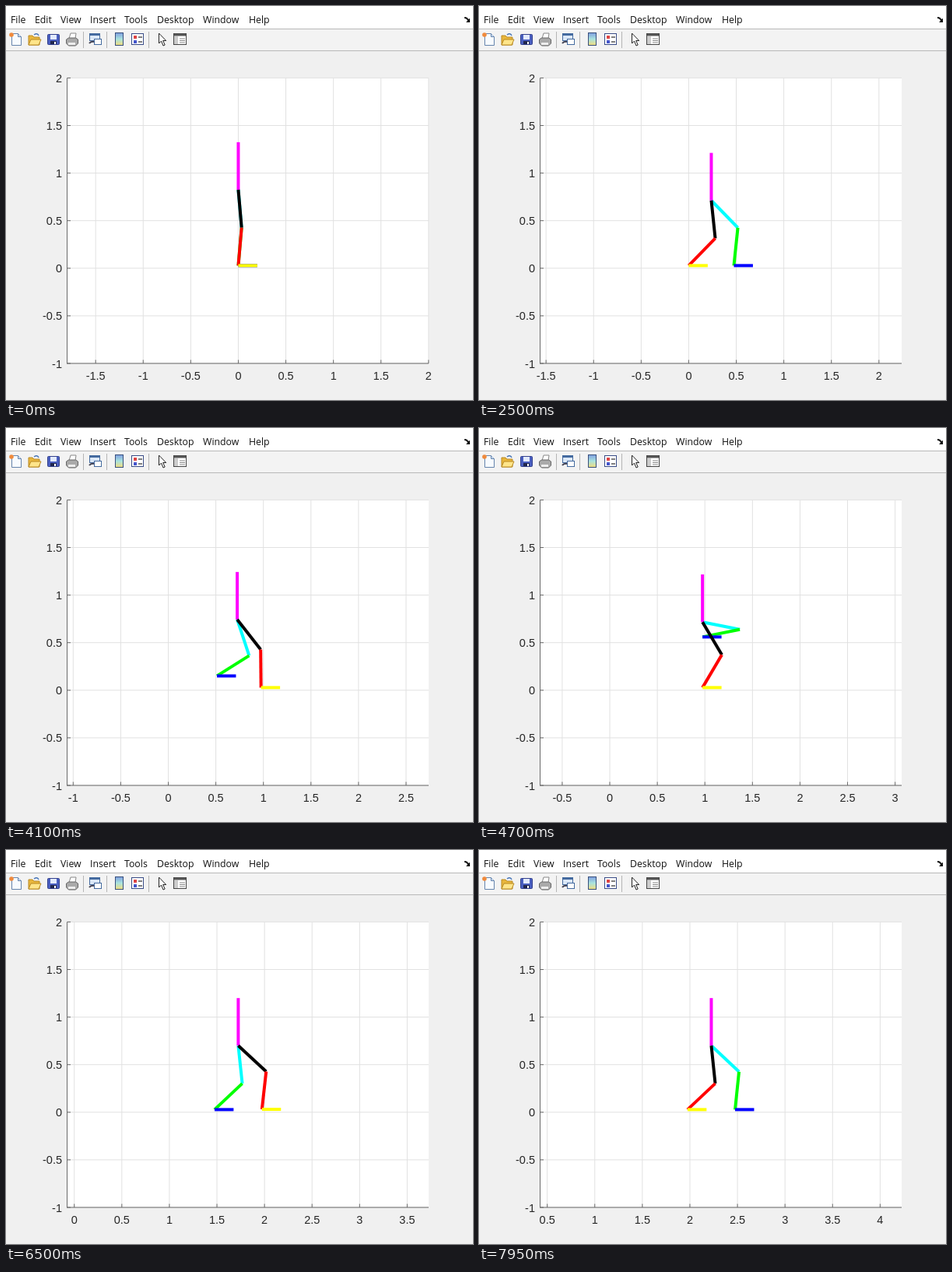
An HTML page with a canvas that plays this animation: 600 px wide and 506 px high, repeating every 8 s.

```html
<!DOCTYPE html>
<html lang="en">
<head>
<meta charset="utf-8">
<title>Walking figure</title>
<style>
  html, body { margin: 0; width: 100%; height: 100%; overflow: hidden; background: #f0f0f0; }
  svg, canvas { position: absolute; left: 0; top: 0; width: 600px; height: 506px; }
  text { font: 12.3px "Open Sans", "Noto Sans", sans-serif; fill: #111; }
</style>
</head>
<body>
<svg viewBox="0 0 600 506">
  <rect width="600" height="29" fill="#fff"/>
  <rect y="29" width="600" height="28" fill="#f3f3f3"/>
  <path d="M0 29.5H600M0 57.5H600" stroke="#b8b8b8"/>
  <g id="menu">
    <text x="6" y="22">File</text><text x="37" y="22">Edit</text>
    <text x="70" y="22">View</text><text x="108" y="22">Insert</text>
    <text x="152" y="22">Tools</text><text x="194" y="22">Desktop</text>
    <text x="253" y="22">Window</text><text x="312" y="22">Help</text>
  </g>
  <path d="M589 14q4 0 5 3l2-1v5h-5l2-2q-1-3-4-3z" fill="#111"/>
  <path d="M99.5 33V54M129.500 33V54M183.500 33V54" stroke="#b5b5b5"/>
  <!-- new -->
  <path d="M7.500 35.500h8l4 4v11h-12z" fill="#f7fbff" stroke="#6685ad"/>
  <path d="M15.500 35.500v4h4" fill="#cfe0f4" stroke="#6685ad"/>
  <circle cx="7" cy="37" r="2.800" fill="#f08a3c"/>
  <!-- open -->
  <path d="M29 50V38h5l2 2h7v10z" fill="#e8b63c" stroke="#b98a24"/>
  <path d="M29 50l3-7h13l-3 7z" fill="#ffe58a" stroke="#b98a24"/>
  <path d="M36 37q4-3 6 1" fill="none" stroke="#4876b8" stroke-width="1.500"/>
  <!-- save -->
  <rect x="53.500" y="36.500" width="15" height="13" rx="1" fill="#4a5fc0" stroke="#33408c"/>
  <rect x="57" y="37" width="8" height="6" fill="#e3ebff"/>
  <rect x="57" y="45" width="8" height="4" fill="#20264e"/>
  <rect x="62" y="46" width="2" height="3" fill="#fff"/>
  <!-- print -->
  <path d="M81 42l2-7h7l-1 7z" fill="#fff" stroke="#888"/>
  <path d="M77.500 43l3-2h9l3 2v5l-3 3h-9l-3-3z" fill="#aaa" stroke="#666"/>
  <path d="M80 47h9v3h-9z" fill="#eee"/>
  <!-- linked plots -->
  <rect x="107.500" y="35.500" width="13" height="9" fill="#dbe8f8" stroke="#446a9f"/>
  <path d="M108 37h12" stroke="#446a9f" stroke-width="2"/>
  <rect x="113.500" y="42.500" width="9" height="7" fill="#fff" stroke="#446a9f"/>
  <path d="M107 48q2-3 6-2" fill="none" stroke="#445" stroke-width="2"/>
  <!-- colour bar -->
  <linearGradient id="bar" x2="0" y2="1">
    <stop stop-color="#7f9fe0"/><stop offset=".5" stop-color="#a9e3de"/><stop offset="1" stop-color="#f1dc7c"/>
  </linearGradient>
  <rect x="140.500" y="34.500" width="10" height="16" fill="url(#bar)" stroke="#38507c"/>
  <!-- legend -->
  <rect x="161.500" y="35.500" width="15" height="14" fill="#fff" stroke="#3a4c87"/>
  <path d="M164 38h4v4h-4z" fill="#d44"/><path d="M164 44h4v4h-4z" fill="#45c"/>
  <path d="M170 40h5M170 46h5" stroke="#555" stroke-width="1.500"/>
  <!-- pointer -->
  <path d="M196.500 35v13l3-3 2.500 6 2.200-1-2.500-5.500h4z" fill="#fff" stroke="#222"/>
  <!-- inspector -->
  <rect x="215.500" y="35.500" width="16" height="14" fill="#fff" stroke="#444"/>
  <path d="M216 37h15" stroke="#555" stroke-width="3"/>
  <path d="M216 39h5v10h-5z" fill="#ccc"/>
  <path d="M223 42h7M223 44.500h7M223 47h7" stroke="#888"/>
</svg>
<canvas id="plot" width="600" height="506"></canvas>
<script>
const ctx = document.getElementById('plot').getContext('2d');
const LOOP = 8000, FIRST = 1200, PERIOD = 1350, MOVE = 1270;
const LEFT = 78.5, RIGHT = 543, TOP = 92.5, BOTTOM = 459, UNIT = 122.2;
const LINK = 0.4, TORSO = 0.5, FOOT = 0.2, GROUND = 0.028;
const KEYS = [0, 0.276, 0.63, 1];

// Smooth curve through four values at KEYS, flat at both ends.
function curve(s, values) {
  const slope = i => i % 3 === 0 ? 0 : (values[i + 1] - values[i - 1]) / (KEYS[i + 1] - KEYS[i - 1]);
  const i = s < KEYS[1] ? 0 : s < KEYS[2] ? 1 : 2;
  const h = KEYS[i + 1] - KEYS[i], u = (s - KEYS[i]) / h, v = 1 - u;
  return values[i] * v * v * (1 + 2 * u) + values[i + 1] * u * u * (3 - 2 * u)
    + h * u * v * (slope(i) * v - slope(i + 1) * u);
}

const landing = k => k < 1 ? 0 : 0.5 * k - 0.025;
const restX = k => (landing(k) + landing(k - 1)) / 2;
const restY = k => k < 1 ? 0.825 : k < 2 ? 0.7125 : 0.7;
const mix = (a, b, p) => a + (b - a) * p;

function poseAt(t) {
  const k = Math.max(1, Math.floor((t - FIRST) / PERIOD) + 1);
  const s = Math.min(1, Math.max(0, (t - FIRST - (k - 1) * PERIOD) / MOVE));
  const alongBody = values => mix(restX(k - 1), restX(k), curve(s, values));
  const swing = {
    x: mix(landing(k - 2), landing(k), curve(s, [0, 0.111, 0.5, 1])),
    y: GROUND + curve(s, [0, 0.256, 0.532, 0])
  };
  const stance = { x: landing(k - 1), y: GROUND };
  const hip = {
    x: alongBody([0, 0.05, 0.5, 1]),
    y: curve(s, [restY(k - 1), k < 2 ? 0.79 : 0.773, 0.717, restY(k)])
  };
  const [near, far] = k % 2 ? [stance, swing] : [swing, stance];
  return { hip, near, far, centre: alongBody([0, 0.106, 0.685, 1]) };
}

// Knee joint, always bent forward.
function kneeOf(hip, ankle) {
  const dx = ankle.x - hip.x, dy = ankle.y - hip.y, d = Math.hypot(dx, dy);
  const bend = Math.sqrt(Math.max(0, LINK * LINK - d * d / 4)) / d;
  return { x: hip.x + dx / 2 - dy * bend, y: hip.y + dy / 2 + dx * bend };
}

function line(x1, y1, x2, y2, color, width) {
  ctx.strokeStyle = color;
  ctx.lineWidth = width;
  ctx.beginPath();
  ctx.moveTo(x1, y1);
  ctx.lineTo(x2, y2);
  ctx.stroke();
}

const toY = y => BOTTOM - (y + 1) * UNIT;

function drawAxes(min, toX) {
  const ticksX = [], ticksY = [];
  for (let n = Math.ceil(min * 2 - 0.001); n / 2 <= min + 3.801; n++) ticksX.push(n / 2);
  for (let n = -2; n <= 4; n++) ticksY.push(n / 2);
  ctx.fillStyle = '#fff';
  ctx.fillRect(LEFT, TOP, RIGHT - LEFT, BOTTOM - TOP);
  for (const v of ticksX) line(toX(v), TOP, toX(v), BOTTOM, '#e1e1e1', 1);
  for (const v of ticksY) line(LEFT, toY(v), RIGHT, toY(v), '#e1e1e1', 1);
  line(LEFT, TOP, LEFT, BOTTOM + 0.5, '#6a6a6a', 1);
  line(LEFT, BOTTOM, RIGHT, BOTTOM, '#6a6a6a', 1);
  ctx.font = '14.5px "Liberation Sans", Arial, sans-serif';
  for (const v of ticksX) {
    line(toX(v), BOTTOM, toX(v), BOTTOM - 4.5, '#6a6a6a', 1);
    ctx.fillStyle = '#262626';
    ctx.textAlign = 'center';
    ctx.fillText(v, toX(v), 480);
  }
  for (const v of ticksY) {
    line(LEFT, toY(v), LEFT + 4.5, toY(v), '#6a6a6a', 1);
    ctx.fillStyle = '#262626';
    ctx.textAlign = 'right';
    ctx.fillText(v, 72, toY(v) + 5.5);
  }
}

function draw(t) {
  const { hip, near, far, centre } = poseAt(t);
  const min = centre - 1.8;
  const toX = x => LEFT + (x - min) * UNIT;
  const limb = (a, b, color) => line(toX(a.x), toY(a.y), toX(b.x), toY(b.y), color, 4);
  const leg = (ankle, thigh, shank, foot) => {
    const knee = kneeOf(hip, ankle);
    limb(hip, knee, thigh);
    limb(knee, ankle, shank);
    limb(ankle, { x: ankle.x + FOOT, y: ankle.y }, foot);
  };
  ctx.clearRect(0, 0, 600, 506);
  drawAxes(min, toX);
  leg(far, '#0ff', '#0f0', '#00f');
  limb(hip, { x: hip.x, y: hip.y + TORSO }, '#f0f');
  leg(near, '#000', '#f00', '#ff0');
}

const start = performance.now();
function tick() {
  const t = (performance.now() - start) % LOOP;
  draw(Math.floor(t / 50) * 50);
  requestAnimationFrame(tick);
}
tick();
</script>
</body>
</html>
```
